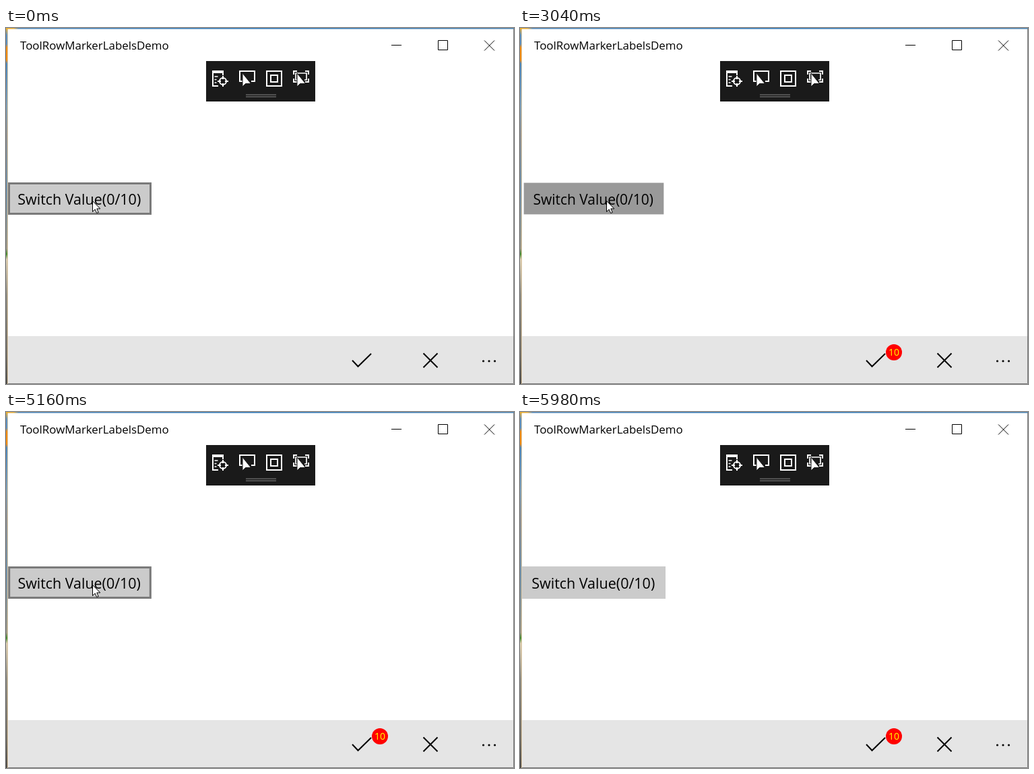
Write an HTML page that moves like this. It is 754 px wide and 528 px high and loops after 6350 ms.

```html
<!DOCTYPE html>
<html lang="en">
<head>
<meta charset="utf-8">
<title>App bar badge</title>
<style>
  html, body { margin: 0; width: 100%; height: 100%; overflow: hidden; background: #fff; }
  svg { display: block; width: 754px; height: 528px; }
  text { font-family: "Open Sans", "Noto Sans", sans-serif; }
  .line { fill: none; stroke: #000; }
  .tool { fill: none; stroke: #fff; stroke-width: 2; }
  .solid { fill: #fff; stroke: #1a1a1a; stroke-width: 1; }
</style>
</head>
<body>
<svg viewBox="0 0 754 528">
  <defs>
    <linearGradient id="side" x2="0" y2="1">
      <stop offset="0" stop-color="#f5b020"/>
      <stop offset=".02" stop-color="#5b8fc0"/>
      <stop offset=".045" stop-color="#5b8fc0"/>
      <stop offset=".055" stop-color="#f08a10"/>
      <stop offset=".09" stop-color="#f08a10"/>
      <stop offset=".1" stop-color="#4a86bd"/>
      <stop offset=".22" stop-color="#7d9db5"/>
      <stop offset=".3" stop-color="#8e8f90"/>
      <stop offset=".45" stop-color="#6d8ea8"/>
      <stop offset=".62" stop-color="#9a9584"/>
      <stop offset=".635" stop-color="#3f8a2c"/>
      <stop offset=".65" stop-color="#d8cbb0"/>
      <stop offset=".75" stop-color="#8d8a80"/>
      <stop offset=".92" stop-color="#6f6a60"/>
      <stop offset="1" stop-color="#4c4a46"/>
    </linearGradient>
    <linearGradient id="top">
      <stop offset="0" stop-color="#f5b020"/>
      <stop offset=".015" stop-color="#e0a83a"/>
      <stop offset=".025" stop-color="#4f86b8"/>
      <stop offset=".5" stop-color="#2f78b8"/>
      <stop offset="1" stop-color="#4d83b0"/>
    </linearGradient>
  </defs>

  <!-- window -->
  <rect width="754" height="528" fill="#fff"/>
  <rect width="754" height="1.5" fill="url(#top)"/>
  <rect width="2" height="528" fill="url(#side)"/>
  <path d="M2.5 1V528" class="line" stroke-opacity=".45" style="stroke:#b98a3c"/>
  <text x="21" y="32" font-size="16.9">ToolRowMarkerLabelsDemo</text>
  <path class="line" d="M572 25.5h15M641.5 18.5h14v14h-14zM710 18.5l15 15M725 18.5l-15 15"/>

  <!-- tool strip -->
  <rect x="297" y="49" width="162" height="60" fill="#1a1a1a"/>
  <path d="M356 99h45M356 102h45" stroke="#858585"/>
  <g class="tool">
    <path d="M322 70V64H307V86H315M306 66H323"/>
    <path d="M309.5 72h5M309.5 76.5h3M309.5 81h3" stroke-width="1.5"/>
    <circle cx="322" cy="79" r="5"/>
    <path d="M322 71v5M322 82v5M314 79h5M325 79h5"/>
    <path d="M353 79H347V64H369V79H364"/>
    <path d="M387 64H409V86H387zM393 70H403V80H393z"/>
    <path d="M427 69V64H432M444 64H449V69M427 75V80H432M444 80H449V75"/>
    <path d="M433 77H430V67H446V77H443" stroke-width="1.7"/>
  </g>
  <path id="toolArrow" class="solid" d="M351 67V87L355.5 82.5H363.5z"/>
  <path class="solid" d="M432 67V87L436.5 82.5H444.5z"/>

  <!-- app bar -->
  <rect x="3" y="457" width="750" height="70" fill="#e5e5e5"/>
  <rect id="hover" x="579" y="457" width="102" height="71"/>
  <path class="line" stroke-width="2" d="M514 493L522.5 502L542 483M619.5 482.5L640.5 503.5M640.5 482.5L619.5 503.5"/>
  <circle cx="708.5" cy="494" r="1.6"/>
  <circle cx="717" cy="494" r="1.6"/>
  <circle cx="725.5" cy="494" r="1.6"/>
  <g id="badge">
    <circle cx="555" cy="481" r="12" fill="#f00"/>
    <text x="555" y="486.3" font-size="14" fill="#ff0" text-anchor="middle">10</text>
  </g>
  <path d="M753.5 1V527.5H3" class="line" style="stroke:#777"/>

  <!-- button -->
  <g id="button">
    <rect id="face" x="3" y="229" width="213" height="48"/>
    <rect id="edge" x="4.5" y="230.5" width="210" height="45" fill="none" stroke="#7a7a7a" stroke-width="3"/>
    <text x="17.2" y="262" font-size="21.5">Switch Value(0/10)</text>
  </g>

  <path id="cursor" d="M.5 .5V16.5L4.2 13L6.7 18.6L9.2 17.5L6.8 12H11.8z" fill="#fff" stroke="#000"/>
</svg>
<script>
const LOOP = 6350;
const REST = [128, 256];

// start ms, button look, button scale, badge, cursor tip, bar highlight
const steps = [
  [0,    "over", 1,     0, REST],
  [1250, "down", .975,  0, REST],
  [1370, "over", .985,  1, REST],
  [1520, "over", .994,  1, REST],
  [1650, "over", .998,  1, REST],
  [1790, "over", 1,     1, REST],
  [3040, "down", .975,  1, REST],
  [3190, "over", .985,  0, REST],
  [3310, "over", .994,  0, REST],
  [3430, "over", .998,  0, REST],
  [3550, "over", 1,     0, REST],
  [4770, "down", .975,  0, REST],
  [4890, "over", .985,  1, REST],
  [5160, "over", .998,  1, REST],
  [5280, "over", 1,     1, REST],
  [5590, "idle", 1,     1, [357, 382]],
  [5710, "idle", 1,     1, [584, 507], .1],
  [5830, "idle", 1,     1, null, .05],
  [5980, "idle", 1,     1, null]
];

const el = id => document.getElementById(id);
const set = (id, name, value) => el(id).setAttribute(name, value);
const show = (id, on) => set(id, "visibility", on ? "visible" : "hidden");
const start = performance.now();
let current;

function draw([, look, scale, badge, tip, shade = 0]) {
  set("button", "transform", `translate(109.5 253) scale(${scale}) translate(-109.5 -253)`);
  set("face", "fill", look === "down" ? "#999" : "#cbcbcb");
  show("edge", look === "over");
  show("badge", badge);
  set("hover", "fill-opacity", shade);
  show("cursor", tip);
  if (tip) set("cursor", "transform", `translate(${tip})`);
}

function tick() {
  const t = (performance.now() - start) % LOOP;
  const step = steps.findLast(s => s[0] <= t) || steps[0];
  if (step !== current) draw(current = step);
  requestAnimationFrame(tick);
}
tick();
</script>
</body>
</html>
```
